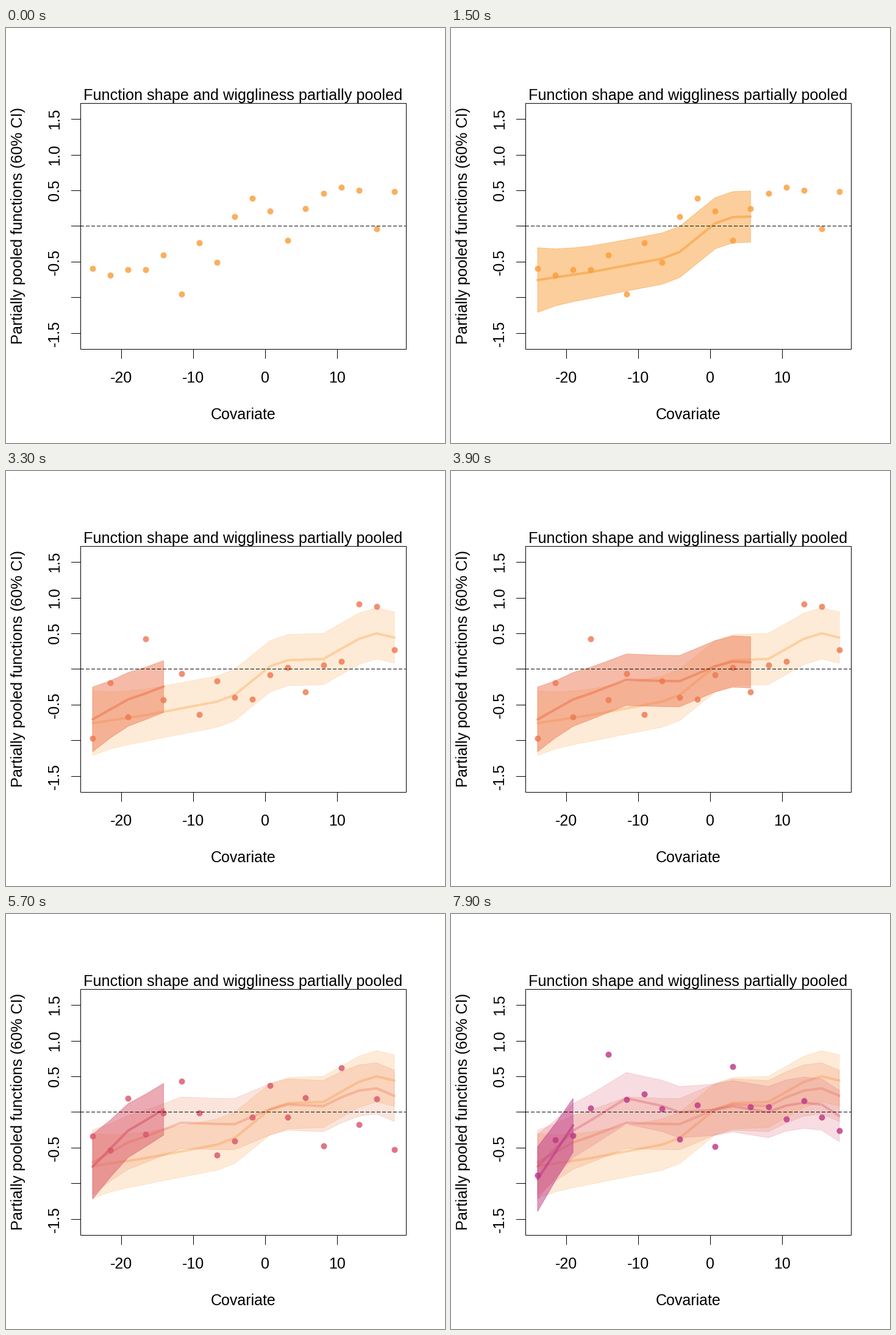
A matplotlib script for the animation above (8 s loop, 720x680 px).

```python
import numpy as np
import matplotlib.pyplot as plt
from matplotlib.animation import FuncAnimation
from matplotlib.colors import to_rgba

W, H, DPI = 720, 680, 80
PX = 72 / DPI            # points per pixel
STEP_MS = 100
CYCLE = 24               # steps per series
DELAY = 5                # steps with points only
FRAMES = 80

LEFT, RIGHT, TOP, BOTTOM = 122, 656, 123, 526
I = np.arange(18)
X = np.linspace(142, 637, len(I))

COLORS = ["#FA9E3B", "#ED7953", "#D8576B", "#BD3786"]

# Observed values per series, as pixel rows
POINTS = [
    [394, 405, 396, 396, 372, 436, 352, 384, 309,
     279, 300, 348, 296, 271, 261, 266, 329, 268],
    [438, 347, 403, 275, 375, 332, 399, 344, 371,
     374, 334, 322, 362, 318, 312, 218, 222, 293],
    [364, 387, 302, 361, 326, 274, 326, 395, 372,
     333, 281, 333, 301, 380, 252, 345, 303, 386],
    [428, 370, 363, 318, 230, 304, 295, 319, 369,
     313, 381, 250, 316, 316, 336, 306, 333, 355],
]

# The pooled curve changes from series to series by a drift and a bend
BASE = np.interp(I, [0, 3, 7, 8, 10, 11, 13, 15, 16, 17],
                 [413, 400, 378, 367, 320, 310, 308, 275, 266, 273])
DRIFT = np.interp(I, [0, 2, 5, 7, 10, 14, 17],
                  [-6, -30, -47, -34, 0, 9, 25])
BEND = 1.25 * np.abs(10.5 - I)
SPREAD = 42 + 11 * np.exp(-I / 1.2)


def curve(n):
    return BASE + n * DRIFT + n * (n - 1) / 2 * BEND


plt.rcParams["font.family"] = "Liberation Sans"
fig = plt.figure(figsize=(W / DPI, H / DPI), dpi=DPI, facecolor="white")
ax = fig.add_axes([0, 0, 1, 1])
ax.set_xlim(0, W)
ax.set_ylim(H, 0)
ax.axis("off")


def rule(xs, ys, **style):
    ax.plot(xs, ys, color="black", lw=PX, zorder=8, **style)


def label(x, y, text, size=25, rotation=0):
    ax.text(x, y, text, size=size * PX, rotation=rotation, ha="center",
            va="baseline", rotation_mode="anchor", color="black", zorder=9)


def draw_axes():
    rule([LEFT, RIGHT, RIGHT, LEFT, LEFT], [TOP, TOP, BOTTOM, BOTTOM, TOP],
         solid_joinstyle="miter")
    rule([LEFT, RIGHT], [324, 324], dashes=(5, 3), antialiased=False)
    for i, value in enumerate((-20, -10, 0, 10)):
        x = 189 + 118 * i
        rule([x, x], [BOTTOM, BOTTOM + 15])
        label(x, 581, str(value))
    for i in range(7):
        value = 1.5 - 0.5 * i
        y = round(149.3 + 58.4 * i)
        rule([LEFT - 15, LEFT], [y, y])
        if value not in (0, -1):
            label(87, y, f"{value:.1f}", rotation=90)
    label(388.5, 118, "Function shape and wiggliness partially pooled", 25.3)
    label(389, 641, "Covariate")
    label(27, 324, "Partially pooled functions (60% CI)", 25.3, 90)


draw_axes()

bands, lines = [], []
for n in range(len(COLORS)):
    band, = ax.fill([0], [0], lw=PX, zorder=2 + 0.2 * n)
    line, = ax.plot([], [], lw=4 * PX, solid_capstyle="round",
                    solid_joinstyle="round", zorder=2.1 + 0.2 * n)
    bands.append(band)
    lines.append(line)
dots, = ax.plot([], [], "o", ms=10 * PX, mew=0, zorder=6)


def reveal(step):
    """Number of curve points shown; skips every third one later on."""
    k = step - DELAY
    if k < 0:
        return 0
    return min(k + max(0, (k - 5) // 2) + 1, len(X))


def update(frame):
    current, step = divmod(frame, CYCLE)
    for n, (color, band, line) in enumerate(zip(COLORS, bands, lines)):
        count = len(X) if n < current else reveal(step) if n == current else 0
        band.set_visible(count > 0)
        line.set_visible(count > 1)
        if not count:
            continue
        fill_alpha, line_alpha = (0.5, 0.6) if n == current else (0.2, 0.35)
        x, mean, spread = X[:count], curve(n)[:count], SPREAD[:count]
        edge = np.r_[mean - spread, (mean + spread)[::-1]]
        band.set_xy(np.column_stack([np.r_[x, x[::-1]], edge]))
        band.set_color(to_rgba(color, fill_alpha))
        line.set_data(x, mean)
        line.set_color(to_rgba(color, line_alpha))
    dots.set_data(X, POINTS[current])
    dots.set_markerfacecolor(to_rgba(COLORS[current], 0.82))
    return [*bands, *lines, dots]


anim = FuncAnimation(fig, update, frames=FRAMES, interval=STEP_MS,
                     init_func=lambda: update(0), repeat=True,
                     repeat_delay=0, blit=False)
plt.show()
```
